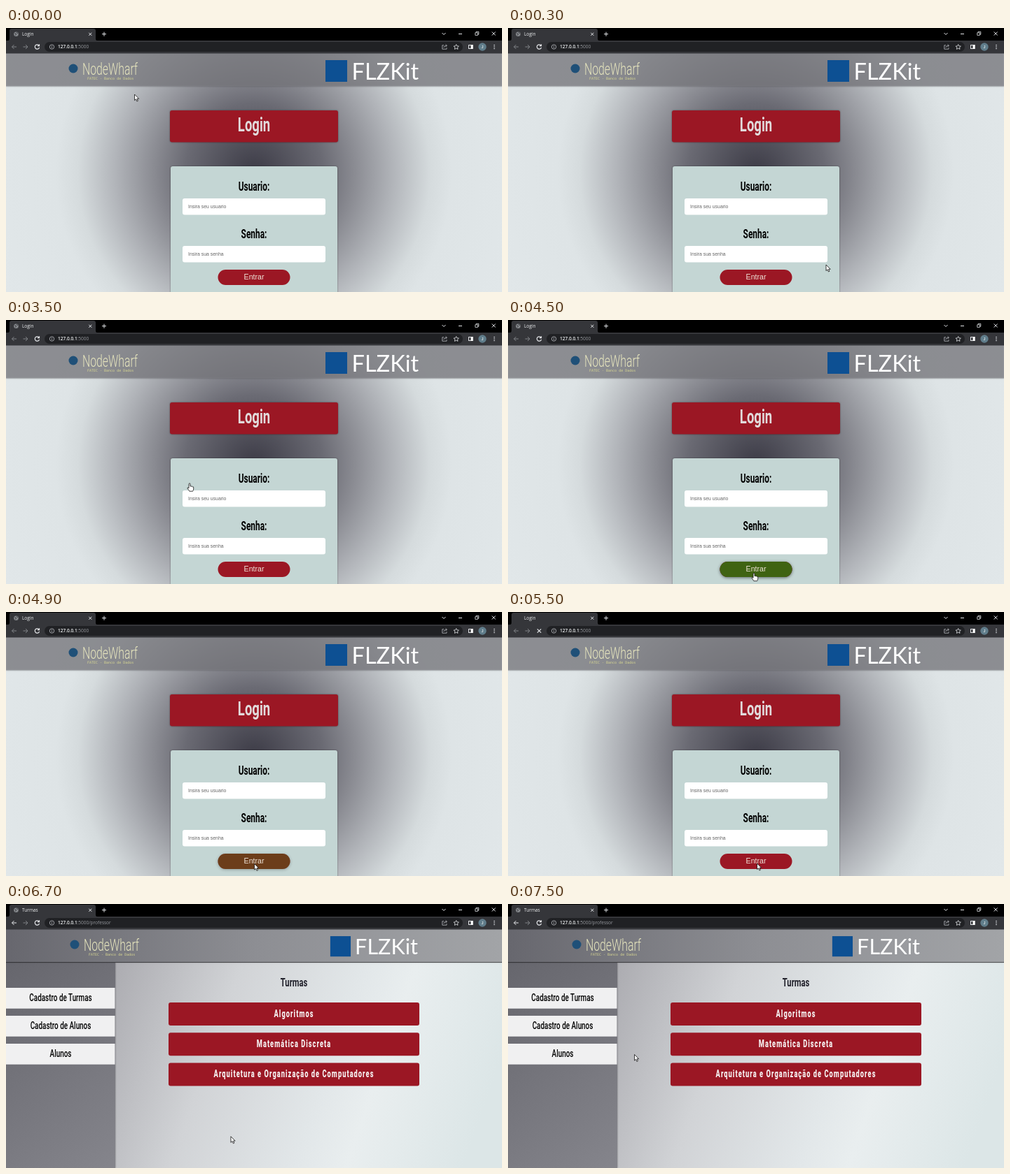
Write an HTML page that moves like this. It is 708x378 px and loops after 8000 ms.

```html
<!DOCTYPE html>
<html lang="pt">
<head>
<meta charset="utf-8">
<title>Login</title>
<style>
html, body { margin: 0; width: 100%; height: 100%; overflow: hidden; background: #000; }
svg { display: block; width: 708px; height: 378px; }
text { font-family: "Liberation Sans", Arial, sans-serif; }
.narrow { font-family: Roboto, sans-serif; text-anchor: middle; }
.ui { font-family: "Open Sans", sans-serif; font-size: 6.5px; fill: #f1f3f4; }
.line { fill: none; stroke: #e4e6e9; stroke-width: 1; }
.shade { filter: drop-shadow(0 .5px 1px #0006); }
</style>
</head>
<body>
<svg viewBox="0 0 708 378">
  <defs>
    <radialGradient id="glow" gradientUnits="userSpaceOnUse" cx="354" cy="207" r="393">
      <stop offset="0" stop-color="#3c3b46"/><stop offset=".25" stop-color="#6a6a73"/>
      <stop offset=".36" stop-color="#898a91"/><stop offset=".5" stop-color="#b0b3b8"/>
      <stop offset=".64" stop-color="#d5dbdd"/><stop offset=".72" stop-color="#dee4e6"/>
      <stop offset="1" stop-color="#e1e7e9"/>
    </radialGradient>
    <linearGradient id="main" gradientUnits="userSpaceOnUse" x1="157" y1="84" x2="690" y2="270">
      <stop offset="0" stop-color="#acacb1"/><stop offset=".3" stop-color="#d1d3d6"/>
      <stop offset=".6" stop-color="#e2e7e9"/><stop offset=".72" stop-color="#e9eeef"/>
      <stop offset="1" stop-color="#dce6e7"/>
    </linearGradient>
    <linearGradient id="side" gradientUnits="userSpaceOnUse" x1="0" y1="84" x2="200" y2="330">
      <stop offset="0" stop-color="#66666d"/><stop offset="1" stop-color="#84848b"/>
    </linearGradient>
    <linearGradient id="bar">
      <stop offset="0" stop-color="#67676e"/><stop offset=".5" stop-color="#8d8e93"/>
      <stop offset="1" stop-color="#a2a4a7"/>
    </linearGradient>
    <g id="brandA">
      <circle cx="96" cy="58" r="6.5" fill="#1f5078"/>
      <g id="brandAText"></g>
      <text x="116" y="73.5" font-size="5" fill="#d6d592" style="font-family:'DejaVu Sans Mono',monospace">FATEC - Banco de Dados</text>
    </g>
    <g id="brandB">
      <rect x="456" y="46" width="31" height="31" fill="#0d5093"/>
      <text x="493.5" y="73.5" font-size="32.5" fill="#fff" style="font-family:Lato,sans-serif">FLZKit</text>
    </g>
  </defs>

  <g id="login">
    <rect y="36" width="708" height="342" fill="url(#glow)"/>
    <rect y="36" width="708" height="47.5" fill="#808186" fill-opacity=".68" class="shade"/>
    <use href="#brandA"/><use href="#brandB"/>
    <rect x="234" y="118" width="240" height="45.5" rx="3" fill="#9b1724" class="shade"/>
    <rect x="235" y="198" width="238" height="190" rx="3" fill="#c4d6d4" class="shade"/>
    <rect x="252" y="244" width="204" height="23.5" rx="3" fill="#fff"/>
    <rect x="252" y="312" width="204" height="23.5" rx="3" fill="#fff"/>
    <g font-size="6.9" fill="#666">
      <text x="260" y="258">Insira seu usuario</text>
      <text x="260" y="326">Insira sua senha</text>
    </g>
    <rect x="302.5" y="346" width="103" height="22" rx="11" fill="#9b1724"/>
    <rect id="hover" x="302.5" y="346" width="103" height="22" rx="11" fill="#3f6312" style="filter:drop-shadow(0 1.5px 2px #0008)"/>
    <text x="354" y="360.3" font-size="10.6" fill="#efe3d8" text-anchor="middle">Entrar</text>
  </g>

  <g id="classes">
    <rect x="156" y="84" width="552" height="294" fill="url(#main)"/>
    <rect y="84" width="156" height="294" fill="url(#side)" class="shade"/>
    <rect y="36" width="708" height="47.5" fill="url(#bar)" class="shade"/>
    <g id="brands">
      <use href="#brandA" x="2"/>
      <use href="#brandB" transform="translate(461 47) scale(.94) translate(-454 -47)"/>
    </g>
  </g>

  <rect width="708" height="18" fill="#000"/>
  <path d="M3 18Q5 18 5 15V4Q5 1 8 1H125Q128 1 128 4V15Q128 18 130 18H708V36.5H0V18Z" fill="#35363a"/>
  <rect x="55" y="20" width="597" height="14" rx="7" fill="#202124"/>
  <g id="favicon"><circle cx="14.5" cy="8.7" r="3.3" fill="#85888c"/><path d="M12.5 7.5l2 1-1 2M15 6l2 2" stroke="#35363a" fill="none"/></g>
  <text id="tab" class="ui" x="23" y="11"></text>
  <g class="line">
    <path d="M118.3 6.8l4 4m0-4l-4 4M137 8.7h6m-3-3v6M622.5 7l2.5 2.5 2.5-2.5M646 8.5h5M693.7 5.5l5 5m0-5l-5 5"/>
    <path d="M669.8 6.8h3.6v3.6h-3.6zM671 6.5v-1.2h3.8v3.9h-1.2" stroke-width=".8"/>
    <path id="back" d="M15 27H8.5m3-3l-3 3 3 3"/>
    <path d="M24.5 27H31m-3-3l3 3-3 3" stroke="#808387"/>
    <path id="reload" d="M47 25a3.2 3.2 0 1 0 .6 2.8M47.5 23.2v2.4h-2.4" stroke-width="1.2"/>
    <path id="stop" d="M41.8 24.3l5.4 5.4m0-5.4l-5.4 5.4" stroke-width="1.2"/>
    <g stroke="#b9bcc0" stroke-width=".8">
      <circle cx="65.5" cy="27" r="3.2"/><path d="M65.5 26.5v2.2m0-3.7v.8"/>
      <path d="M625 24.7h-2.2v5.5h6.2v-2M624.8 28q.3-2.8 4.2-2.8m-1.5-1.7l2 1.7-2 1.7"/>
      <path d="M642.7 23.5l1.1 2.3 2.6.3-1.9 1.7.5 2.6-2.3-1.3-2.3 1.3.5-2.6-1.9-1.7 2.6-.3z" stroke="#e4e6e9"/>
    </g>
    <rect x="660.5" y="24.5" width="5.5" height="5"/>
  </g>
  <rect x="663.5" y="24" width="3" height="6" fill="#fff"/>
  <circle cx="680" cy="27" r="5.7" fill="#607d8b"/>
  <text x="680" y="29.2" font-size="6" fill="#fff" text-anchor="middle">J</text>
  <g fill="#e4e6e9"><circle cx="697" cy="24.5" r=".8"/><circle cx="697" cy="27" r=".8"/><circle cx="697" cy="29.5" r=".8"/></g>
  <text class="ui" x="74" y="29.4"><tspan font-weight="600">127.0.0.1</tspan><tspan id="path" fill="#979a9f"></tspan></text>

  <g id="cursor" fill="#fff" stroke="#111" stroke-width=".8" stroke-linejoin="round">
    <path id="arrow" d="M0 0V8.6L2 6.8 3.4 10 4.9 9.3 3.5 6.3H6.2Z"/>
    <path id="hand" d="M-1 1Q0-.6 1 1V4.6Q2 3.9 2.8 4.9 3.8 4.3 4.3 5.3 5.7 4.8 5.7 6.3V8.4Q5.6 10 4.6 11.7H-.2Q-1.2 9.7-3 7.6-3.2 6-1.8 6.6L-1 7.4Z"/>
  </g>
</svg>
<script>
const $ = id => document.getElementById(id);

// Condensed heading type: one squeeze for every label
const narrow = (str, x, y, size, fill, weight = 600, gap = 0) =>
  `<text class="narrow" transform="translate(${x} ${y}) scale(.66 1)" font-size="${size}"
    font-weight="${weight}" fill="${fill}" letter-spacing="${gap}">${str}</text>`;
const add = (id, html) => $(id).insertAdjacentHTML('beforeend', html);

add('brandAText', narrow('NodeWharf', 148.5, 67, 24, '#e6e5bd', 300));
add('login', narrow('Login', 354, 148, 28, '#e2dadb') +
  narrow('Usuario:', 354, 233, 18, '#000') + narrow('Senha:', 354, 301, 18, '#000'));
add('classes', narrow('Turmas', 411, 117.5, 17, '#22222c', 700));
['Cadastro de Turmas', 'Cadastro de Alunos', 'Alunos'].forEach((s, i) => {
  const y = 120 + 40 * i;
  add('classes', `<rect y="${y}" width="155.5" height="29.7" fill="#f0f0f1"/>` + narrow(s, 78, y + 19, 15, '#000', 500));
});
['Algoritmos', 'Matemática Discreta', 'Arquitetura e Organização de Computadores'].forEach((s, i) => {
  const y = 141 + 43.2 * i;
  add('classes', `<rect x="232" y="${y}" width="358" height="33" rx="3" fill="#9b1724"/>` +
    narrow(s, 411, y + 21, 14, '#f4eeee', 800, 1.6));
});

// Keys: time, then values, linear in between
const moves = [
  [0, 183.5, 95], [300, 454, 339], [2400, 454, 339], [2500, 252.5, 248], [2800, 352, 357],
  [3000, 355.5, 360], [3100, 355.5, 360], [3200, 357, 362], [3400, 357, 362], [3500, 262, 233.5],
  [3700, 251, 243], [4300, 388, 357], [4500, 351, 362], [5000, 355.5, 360], [6000, 355.5, 360],
  [6300, 338.5, 347.5], [6600, 338.5, 347.5], [7500, 180.5, 215.5], [8000, 180.5, 215.5]
];
const hovers = [[0, 0], [2700, 0], [2800, 1], [2900, 1], [3000, 0], [4300, 0], [4500, 1], [4800, 1], [5000, 0], [8000, 0]];

function at(keys, t) {
  const i = keys.findIndex(k => k[0] > t), a = keys[i - 1], b = keys[i];
  const f = (t - a[0]) / (b[0] - a[0]);
  return a.slice(1).map((v, n) => v + (b[n + 1] - v) * f);
}
const within = (t, ...spans) => spans.some(([a, b]) => t >= a && t < b);
const show = (id, on) => $(id).style.display = on ? '' : 'none';

function draw(now) {
  const t = Math.floor(now % 8000 / 100) * 100;
  const inside = t >= 5600;
  const loading = within(t, [2900, 3000], [5400, 5600]);
  const hand = within(t, [2800, 3000], [3200, 3600], [4300, 4900]);
  show('login', !inside);
  show('classes', inside);
  show('brands', t >= 5700);
  show('favicon', !loading);
  show('reload', !loading);
  show('stop', loading);
  show('arrow', !hand);
  show('hand', hand);
  $('tab').textContent = inside ? 'Turmas' : 'Login';
  $('path').textContent = inside ? ':5000/professor' : ':5000';
  $('back').style.stroke = inside ? '#e4e6e9' : '#808387';
  $('hover').style.opacity = at(hovers, t)[0];
  $('cursor').setAttribute('transform', `translate(${at(moves, t)})`);
}

let start;
function tick(now) {
  start ??= now;
  draw(now - start);
  requestAnimationFrame(tick);
}
draw(0);
requestAnimationFrame(tick);
</script>
</body>
</html>
```
